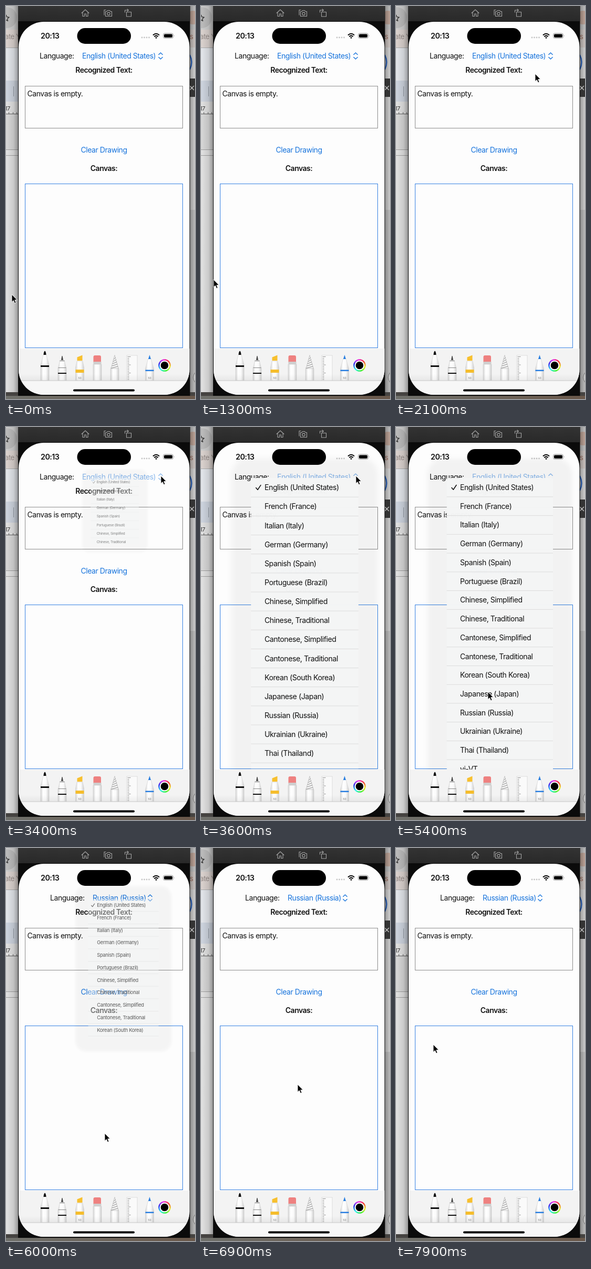
Animation, 360 px wide and 748 px high, one loop 8 s. Source, as an HTML page:

```html
<!DOCTYPE html>
<html lang="en">
<head>
<meta charset="utf-8">
<title>Handwriting language menu</title>
<style>
html, body { margin: 0; width: 100%; height: 100%; overflow: hidden; background: #000; }
svg { display: block; width: 360px; height: 748px; }
text { font: 14px Inter, Roboto, sans-serif; letter-spacing: -.032em; fill: #111; white-space: pre; }
.bold { font-weight: 600; letter-spacing: -.037em; }
.mid { text-anchor: middle; }
.blue { fill: #1673dc; }
.tiny { font-size: 5px; fill: #777; letter-spacing: 0; }
.line { fill: none; stroke-linecap: round; stroke-linejoin: round; }
#halo { filter: blur(5px); }
</style>
</head>
<body>
<svg viewBox="0 0 360 748" xmlns="http://www.w3.org/2000/svg">
  <defs>
    <linearGradient id="shadeL"><stop offset="0" stop-opacity=".06"/><stop offset=".6" stop-opacity=".16"/><stop offset="1" stop-opacity=".4"/></linearGradient>
    <linearGradient id="shadeR"><stop offset="0" stop-opacity=".38"/><stop offset="1" stop-opacity=".14"/></linearGradient>
    <linearGradient id="bar" x2="0" y2="1"><stop offset="0" stop-color="#333"/><stop offset="1" stop-color="#292929"/></linearGradient>
    <linearGradient id="desk"><stop offset="0" stop-color="#6f706b"/><stop offset="1" stop-color="#6a584a"/></linearGradient>
    <linearGradient id="body"><stop offset="0" stop-color="#d4d4d4"/><stop offset=".3" stop-color="#fff"/><stop offset=".65" stop-color="#fafafa"/><stop offset="1" stop-color="#cdcdcd"/></linearGradient>
    <linearGradient id="fade" x2="0" y2="1"><stop offset="0" stop-opacity="0"/><stop offset="1" stop-opacity=".14"/></linearGradient>
    <clipPath id="phone"><rect x="24" y="30" width="325.5" height="710" rx="48"/></clipPath>
    <clipPath id="menuClip"><rect id="clipRect" x="96.5" y="97" width="202.5" height="555"/></clipPath>
    <clipPath id="left"><rect width="23" height="748"/></clipPath>
  </defs>

  <!-- desktop behind the simulator -->
  <rect width="360" height="748" fill="#f1f1f1"/>
  <g clip-path="url(#left)">
    <rect width="24" height="45" fill="#dcdcdc"/>
    <circle cx="1" cy="22" r="20" fill="#c9c9c9"/>
    <path class="line" d="M0 17L2 21L6 21.500L2.500 24.500L3.500 28.500L0 26.500" stroke="#333" stroke-width="1.300"/>
    <rect y="45" width="24" height="34" fill="#eae1dd"/>
    <text x="-2" y="63" style="font-size:13px;fill:#9c918e">ate Y</text>
    <rect y="79" width="24" height="1" fill="#b9b9b9"/>
    <rect y="80" width="24" height="62" fill="#f3f6fb"/>
    <rect y="142" width="24" height="40" fill="#dce3ee"/>
    <rect x="14" y="153" width="1" height="19" fill="#9aa1ab"/>
    <text x="-2" y="199" style="font-size:11px;fill:#333">17</text>
    <path d="M0 205.500H24M5.500 202V206M13.500 202V206M20.500 202V206" stroke="#666"/>
    <rect y="206" width="24" height="67" fill="#e6e6e6"/>
    <path d="M0 273.500H24M0 284.500H24" stroke="#aaa"/>
  </g>
  <rect width="24" height="748" fill="url(#shadeL)"/>
  <g>
    <rect x="350" width="10" height="45" fill="#dcdcdc"/>
    <rect x="350" y="45" width="10" height="34" fill="#eae1dd"/>
    <circle cx="356" cy="22" r="13" fill="#d9bcae"/>
    <text x="350" y="63" style="font-size:13px;fill:#b07a68">s</text>
    <path d="M350 93Q357 107 350 121" fill="none" stroke="#2f6fd6" stroke-width="2.500"/>
    <rect x="350" y="173" width="10" height="215" fill="#eee"/>
    <rect x="350" y="388" width="10" height="352" fill="#d9d9d9"/>
    <path d="M360 698Q353 707 360 716" fill="#eee" stroke="#888"/>
    <rect x="350" width="10" height="748" fill="url(#shadeR)"/>
    <rect x="350" y="138" width="10" height="35" fill="#333"/>
    <path d="M350 152L358 160M358 152L350 160" stroke="#ccc" stroke-width="1.300"/>
  </g>
  <rect y="735" width="360" height="7" fill="#454341"/>
  <rect y="742" width="360" height="6" fill="url(#desk)"/>

  <!-- simulator window -->
  <rect x="23" width="327.500" height="742" fill="#0b0b0b"/>
  <rect x="23" width="327.500" height="29" fill="url(#bar)"/>
  <g class="line" stroke="#a5a5a5" stroke-width="1.100">
    <path d="M144 13.500L151 7L158 13.500M146 12V19.500H149.500V15H152.500V19.500H156V12"/>
    <path d="M189.500 10.500H192L193.500 8.500H197.500L199 10.500H201.500V19.500H189.500ZM187 17V7.500H190"/>
    <circle cx="195.500" cy="14.700" r="2.600"/>
    <path d="M229.500 11.500H238.500V20H229.500ZM226.500 12V8H233M231 5.800L233.300 8L231 10.200"/>
  </g>

  <g clip-path="url(#phone)">
    <rect x="24" y="30" width="326" height="710" fill="#fdfdfd"/>
    <text class="bold" x="66" y="62" style="font-size:14.300px">20:13</text>
    <rect x="135.500" y="42" width="102.500" height="30" rx="15"/>
    <g fill="#c4c4c4"><circle cx="259" cy="60" r="1.400"/><circle cx="263.500" cy="60" r="1.400"/><circle cx="268" cy="60" r="1.400"/><circle cx="272.500" cy="60" r="1.400"/></g>
    <g class="line" stroke="#000" stroke-width="2" style="stroke-linecap:butt">
      <path d="M280 55.500Q286 50 292 55.500M282.300 58.200Q286 55 289.700 58.200"/>
    </g>
    <path d="M284 60Q286 58.500 288 60L286 62.200Z"/>
    <rect x="299.500" y="52" width="19" height="9.500" rx="3" fill="none" stroke="#999"/>
    <rect x="301" y="53.500" width="16" height="6.500" rx="1.800"/>
    <path d="M320 55V58.500Q321.500 56.700 320 55" fill="#999"/>

    <g id="picker">
      <text x="64" y="100">Language:</text>
      <g id="choice">
        <text id="label" class="blue" x="145" y="100"></text>
        <path id="chevron" class="line" d="M290.800 92.500L294.500 89L298.200 92.500M290.800 97.500L294.500 101L298.200 97.500" stroke="#1673dc" stroke-width="1.300"/>
      </g>
    </g>
    <text class="bold mid" x="186.500" y="127">Recognized Text:</text>
    <rect x="36.500" y="152.500" width="300" height="80" fill="none" stroke="#8c8c8c"/>
    <text x="40.500" y="172">Canvas is empty.</text>
    <text class="blue mid" x="186.500" y="279">Clear Drawing</text>
    <text class="bold mid" x="186.500" y="314">Canvas:</text>
    <rect x="36.500" y="338.500" width="300" height="312" fill="none" stroke="#3480e2"/>

    <g id="menu">
      <rect id="halo" x="60" y="60" width="276" height="640" rx="30" fill-opacity=".045"/>
      <g clip-path="url(#menuClip)">
        <rect id="sheet" x="96.500" y="97" width="202.500" height="600" fill="#f4f5f5"/>
        <g id="rows">
          <path class="line" d="M106 115.500L109.200 119.200L115 110.500" stroke="#111" stroke-width="1.600"/>
        </g>
        <rect id="thumb" x="294.800" y="108" width="2.500" height="560" rx="1.250" fill="#8b8b8b"/>
      </g>
    </g>

    <rect x="24" y="652" width="326" height="61" fill="#f3f3f3"/>
    <g id="tools"></g>
    <rect x="24" y="700" width="326" height="13" fill="url(#fade)" opacity=".35"/>
    <rect x="24" y="713" width="326" height="30" fill="#f7f7f7"/>
    <path d="M24 713H350" stroke="#c6c6c6"/>
    <rect x="128" y="729.500" width="117" height="4" rx="2"/>
  </g>

  <path id="cursor" d="M0 0V14.500L3.300 11.500L5.600 16.800L8 15.800L5.800 10.600H10.300Z" stroke="#fff" stroke-width=".9"/>
</svg>
<script>
const $ = id => document.getElementById(id);
const add = (id, markup) => $(id).insertAdjacentHTML('beforeend', markup);

const LOOP = 8000, STEP = 100, PITCH = 35.73, TOP = 97;
const languages = ['English (United States)', 'French (France)', 'Italian (Italy)',
  'German (Germany)', 'Spanish (Spain)', 'Portuguese (Brazil)', 'Chinese, Simplified',
  'Chinese, Traditional', 'Cantonese, Simplified', 'Cantonese, Traditional',
  'Korean (South Korea)', 'Japanese (Japan)', 'Russian (Russia)',
  'Ukrainian (Ukraine)', 'Thai (Thailand)', 'vi-VT'];

languages.forEach((name, i) => {
  const y = 115 + i * PITCH;
  add('rows', `<text x="122" y="${y + 5}">${name}</text>
    <path d="M96 ${y + PITCH / 2}H300" stroke="#dadada" stroke-width=".9"/>`);
});

// Drawing tools
const shape = (d, fill, extra = '') => `<path d="${d}" fill="${fill}" ${extra}/>`;
const body = (x, y, neck, base) => shape(
  `M${x - neck} ${y}H${x + neck}L${x + 8} ${base}V713H${x - 8}V${base}Z`,
  'url(#body)', 'stroke="#cfcfcf" stroke-width=".6"');
const band = (x, y, h, fill, half = 8) =>
  `<rect x="${x - half}" y="${y}" width="${half * 2}" height="${h}" fill="${fill}"/>`;
const size = x => `<text class="tiny mid" x="${x}" y="710">50</text>`;

let tools = body(74, 663, 2.5, 683) + shape('M71.500 664Q72 657 74 656.500Q76 657 76.500 664Z', '#111') + band(74, 684, 3, '#111');
tools += body(107, 674, 4, 690) + shape('M105 674L106.500 666H107.500L109 674Z', '#444') +
  band(107, 675, 1, '#777', 4.5) + band(107, 688, 1, '#888', 7.5) + band(107, 698, 2, '#111');
tools += body(140.5, 676, 5.5, 688) + shape('M135.500 675V668.500L145.500 664.500V675Z', '#f7c02f') +
  band(140.5, 692, 6, '#f5bd2c') + size(140.5);
tools += body(174, 682, 8, 684) + '<rect x="166.500" y="665" width="14.500" height="15" rx="3" fill="#ee8180"/>' +
  band(174, 677, 5, '#cfcfcf', 7.5);
tools += body(207, 688, 7, 691) + shape('M207 664.500L214 690H200Z', '#f4f4f4', 'stroke="#aaa" stroke-width=".6"');
for (let i = 0; i < 5; i++) {
  const y = 671 + i * 4.2, w = (y - 664) * .27;
  tools += `<path d="M${207 - w} ${y + 1.5}L${207 + w} ${y - 2}" stroke="#8d8d8d" stroke-width="1"/>`;
}
tools += '<rect x="230" y="665" width="20" height="50" fill="#fafafa" stroke="#d2d2d2" stroke-width=".7"/>';
for (let i = 0; i < 15; i++)
  tools += `<path d="M231.500 ${667.5 + i * 3.1}h${i % 5 ? 3 : 6}" stroke="#777" stroke-width=".8"/>`;
tools += body(273.5, 671, 2.5, 690) + shape('M271 672L273.500 664L276 672Z', '#2a7fe0') +
  band(273.5, 692.5, 2.5, '#2a7fe0') + size(273.5);

const spot = (r, a) => `${302 + r * Math.cos(a)} ${684 + r * Math.sin(a)}`;
tools += '<circle cx="302" cy="684" r="12" fill="#fff"/>';
for (let i = 0; i < 36; i++) {
  const a = i * Math.PI / 18;
  tools += `<path d="M${spot(10.6, a)}L${spot(10.6, a + .2)}" stroke="hsl(${i * 10 + 50} 85% 56%)" stroke-width="2.500"/>`;
}
tools += '<circle cx="302" cy="684" r="7.300"/>';
add('tools', tools);

// time, x, y
const pointer = [[0, 11, 549], [1200, 11, 549], [1500, 50, 464], [1800, 146, 352], [2000, 254, 150],
  [2100, 265, 129], [2600, 284, 106], [3000, 295, 93], [3700, 295, 93], [4000, 240, 285],
  [4300, 194, 406], [4500, 181, 420], [4900, 181, 420], [5200, 165, 462], [5500, 180, 525],
  [5700, 188, 543], [6600, 188, 543], [6900, 184, 450], [7100, 173, 392], [7300, 126, 373],
  [7500, 86, 385], [7700, 75, 379], [7900, 71, 374]];
const thumb = [[0, 0], [3700, 0], [3900, 1], [4300, 1], [4500, 0]];
// time, scale, shift, visible height, text opacity, sheet opacity
const poses = [[0, 0, 0, 0, 0, 0],
  [3400, .455, 0, 275, .5, .45], [3500, .87, 0, 510, .9, .88], [3600, 1.0115, 0, 547, 1, .985],
  [3700, 1.008, 0, 550, 1, .985], [3800, 1.003, 0, 553, 1, .985], [3900, 1, 0, 555, 1, .985],
  [5900, .9, 8, 510, .9, .85], [6000, .664, 20, 400, .68, .42], [6100, .47, 25, 290, .25, .15],
  [6200, 0, 0, 0, 0, 0]];

const last = (track, t) => track.findLastIndex(k => k[0] <= t);
function lerp(track, t) {
  const i = last(track, t), a = track[i], b = track[i + 1] || a;
  const u = b === a ? 0 : (t - a[0]) / (b[0] - a[0]);
  return a.slice(1).map((v, j) => v + (b[j + 1] - v) * u);
}

function draw(t) {
  const [x, y] = lerp(pointer, t);
  $('cursor').setAttribute('transform', `translate(${x} ${y})`);

  const picked = t >= 5900;
  $('label').textContent = languages[picked ? 12 : 0];
  $('picker').setAttribute('transform', `translate(${picked ? 20 : 0} 0)`);
  $('chevron').setAttribute('transform', `translate(${picked ? -40 : 0} 0)`);
  $('choice').setAttribute('opacity', t >= 3100 && !picked ? (t < 3200 ? .75 : .5) : 1);

  const [, scale, shift, height, ink, sheet] = poses[last(poses, t)];
  $('menu').style.display = scale ? '' : 'none';
  if (!scale) return;
  $('menu').setAttribute('transform',
    `translate(${215 + shift} ${TOP}) scale(${scale}) translate(-215 ${-TOP})`);
  $('clipRect').setAttribute('height', height);
  $('halo').setAttribute('height', height + 74);
  $('halo').setAttribute('opacity', Math.min(1, ink * 1.3));
  $('sheet').setAttribute('opacity', sheet);
  $('rows').setAttribute('opacity', ink);
  $('thumb').setAttribute('opacity', lerp(thumb, t)[0]);
}

const start = performance.now();
function tick() {
  const t = (performance.now() - start) % LOOP;
  draw(Math.floor(t / STEP) * STEP);
  requestAnimationFrame(tick);
}
tick();
</script>
</body>
</html>
```
